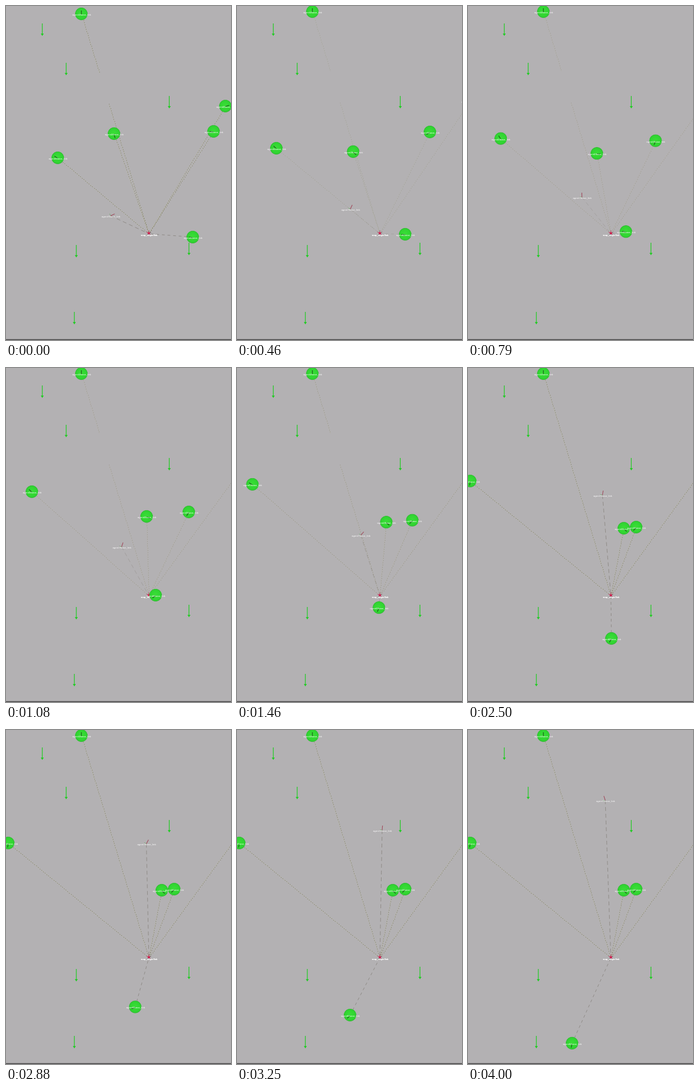
These frames come from a looping animation (400x594 px, 4.04 s). An HTML page with a canvas:

```html
<!DOCTYPE html>
<html lang="en">
<head>
<meta charset="utf-8">
<title>Transform frames</title>
<style>
html, body { margin: 0; width: 100%; height: 100%; overflow: hidden; background: #b3b1b3; }
canvas { display: block; }
</style>
</head>
<body>
<canvas id="stage" width="400" height="594"></canvas>
<script>
const ctx = document.getElementById('stage').getContext('2d');
const LOOP = 4040, FPS = 24, TAU = Math.PI * 2;
const REFRESH = 49; // step at which the links become crisp
const TIMES = [0, 11, 26, 45, 60, 78, 96];
const ORIGIN = { x: 254, y: 405 };

const arrows = [[64.5, 31], [107, 101], [290.3, 160], [325.3, 421], [125, 425], [121.5, 544]];

// Each path holds one waypoint per entry of TIMES; a short path comes to rest early.
const nodes = [
  { path: [[134, 14], [134, 10]], gap: [0.27, 0.41] },
  { path: [[192, 227], [206.5, 259], [250, 264], [277, 285]] },
  { path: [[369, 223], [343, 224], [325, 256], [299, 283]] },
  { path: [[390, 178], [415, 169], [430, 163]] },
  { path: [[92, 270], [70, 253], [46, 220], [9, 197], [4, 201]] },
  { path: [[332, 411], [299, 406], [266, 404], [243, 455], [255, 481], [201, 507], [185, 557]], dash: [5, 5] },
  { path: [[186, 373], [201.5, 361], [205.5, 318], [236.5, 274], [239, 226], [258, 178], [244, 125]], dash: [7, 5], bare: true }
];
nodes.forEach((n, i) => n.name = `agent${i + 1}/base_link`);

function spline(a, b, c, d, k) {
  return b + k / 2 * (c - a + k * (2 * a - 5 * b + 4 * c - d + k * (3 * (b - c) + d - a)));
}

function at(path, step) {
  const last = path.length - 1;
  const t = Math.min(step, TIMES[last]);
  let i = 0;
  while (i < last - 1 && TIMES[i + 1] <= t) i++;
  const k = (t - TIMES[i]) / (TIMES[i + 1] - TIMES[i]);
  const p = [i - 1, i, i + 1, i + 2].map(j => path[Math.max(0, Math.min(last, j))]);
  return [0, 1].map(c => spline(...p.map(q => q[c]), k));
}

// The axis mark points along the direction of travel.
function heading(path, step) {
  const t = Math.max(2, Math.min(step, TIMES[path.length - 1] - 1));
  const [x1, y1] = at(path, t - 2), [x2, y2] = at(path, t + 1);
  return Math.atan2(y2 - y1, x2 - x1);
}

function line(x1, y1, x2, y2, color, width, dash = []) {
  ctx.strokeStyle = color;
  ctx.lineWidth = width;
  ctx.setLineDash(dash);
  ctx.beginPath();
  ctx.moveTo(x1, y1);
  ctx.lineTo(x2, y2);
  ctx.stroke();
  ctx.setLineDash([]);
}

function ray(x, y, angle, len, color, width) {
  line(x, y, x + Math.cos(angle) * len, y + Math.sin(angle) * len, color, width);
}

function arrow([x, y]) {
  line(x, y, x, y + 19, '#28cb2a', 1.3);
  ctx.fillStyle = '#22cb24';
  ctx.beginPath();
  ctx.moveTo(x - 2.7, y + 18);
  ctx.lineTo(x + 2.7, y + 18);
  ctx.lineTo(x, y + 22.3);
  ctx.fill();
}

function dots(x1, y1, x2, y2) {
  line(x1, y1, x2, y2, 'rgba(176,174,138,.4)', 1);
  const n = Math.hypot(x2 - x1, y2 - y1) / 4;
  ctx.fillStyle = 'rgba(96,94,70,.6)';
  for (let i = 0; i < n; i++) {
    const k = i / n;
    ctx.fillRect(Math.round(x1 + (x2 - x1) * k), Math.round(y1 + (y2 - y1) * k), 1, 1);
  }
}

function link(node, [x, y], step) {
  const crisp = step >= REFRESH;
  const part = (a, b) => {
    const pts = [a, b].flatMap(k => [x + (ORIGIN.x - x) * k, y + (ORIGIN.y - y) * k]);
    if (node.dash) line(...pts, 'rgba(112,106,98,.55)', 1, node.dash);
    else dots(...pts);
  };
  // Links fade at first, then slowly recover.
  ctx.globalAlpha = crisp ? 1 : step < 11 ? 1 - step * .06 : .34 + (step - 11) * .01;
  if (node.gap && !crisp) {
    part(0, node.gap[0]);
    part(node.gap[1], 1);
  } else {
    part(0, 1);
  }
  ctx.globalAlpha = 1;
}

function ball(x, y) {
  const g = ctx.createRadialGradient(x - .5, y - 1, 2, x, y, 11.4);
  g.addColorStop(0, '#38dc36');
  g.addColorStop(.75, '#30d431');
  g.addColorStop(.92, '#2fc031');
  g.addColorStop(1, 'rgba(70,180,70,.3)');
  ctx.fillStyle = g;
  ctx.beginPath();
  ctx.arc(x, y, 11.4, 0, TAU);
  ctx.fill();
}

function label(text, x, y, passes = 1) {
  ctx.font = '4.4px "Liberation Sans", Arial, sans-serif';
  ctx.textAlign = 'center';
  ctx.textBaseline = 'middle';
  ctx.fillStyle = '#fff';
  for (let i = 0; i < passes; i++) ctx.fillText(text, x, y);
}

function marker(node, [x, y], angle) {
  if (node.bare) {
    ray(x, y, angle - TAU / 4, 4, 'rgba(60,160,60,.5)', 1);
    ray(x, y, angle, 8, '#a0485a', 1.1);
  } else {
    ball(x, y);
    ray(x, y + 1, angle, 7, '#1f681d', 1.4);
  }
  label(node.name, x + .5, y + 1.7);
}

function origin() {
  const { x, y } = ORIGIN;
  ray(x, y, -TAU / 4, 6, '#b84860', 1);
  ray(x - 4, y - 3, .6, 8, '#c8285a', 1);
  ray(x + 4, y - 3, TAU / 2 - .6, 8, '#7d5a62', 1);
  ctx.fillStyle = '#d02050';
  ctx.beginPath();
  ctx.arc(x, y - 1, 2.1, 0, TAU);
  ctx.fill();
  label('map_origin/link', x + .5, y + 3.2, 2);
}

function draw(ms) {
  const step = Math.floor((ms % LOOP + 5) * FPS / 1000);
  ctx.fillStyle = '#b3b1b3';
  ctx.fillRect(0, 0, 400, 594);
  ctx.fillStyle = '#454445';
  ctx.fillRect(0, 592.6, 400, 1.4);
  arrows.forEach(arrow);
  for (const n of nodes) link(n, at(n.path, step), step);
  origin();
  for (const n of nodes) marker(n, at(n.path, step), heading(n.path, step));
}

let start;
function tick(now) {
  start ??= now;
  draw(now - start);
  requestAnimationFrame(tick);
}
draw(0);
requestAnimationFrame(tick);
</script>
</body>
</html>
```
